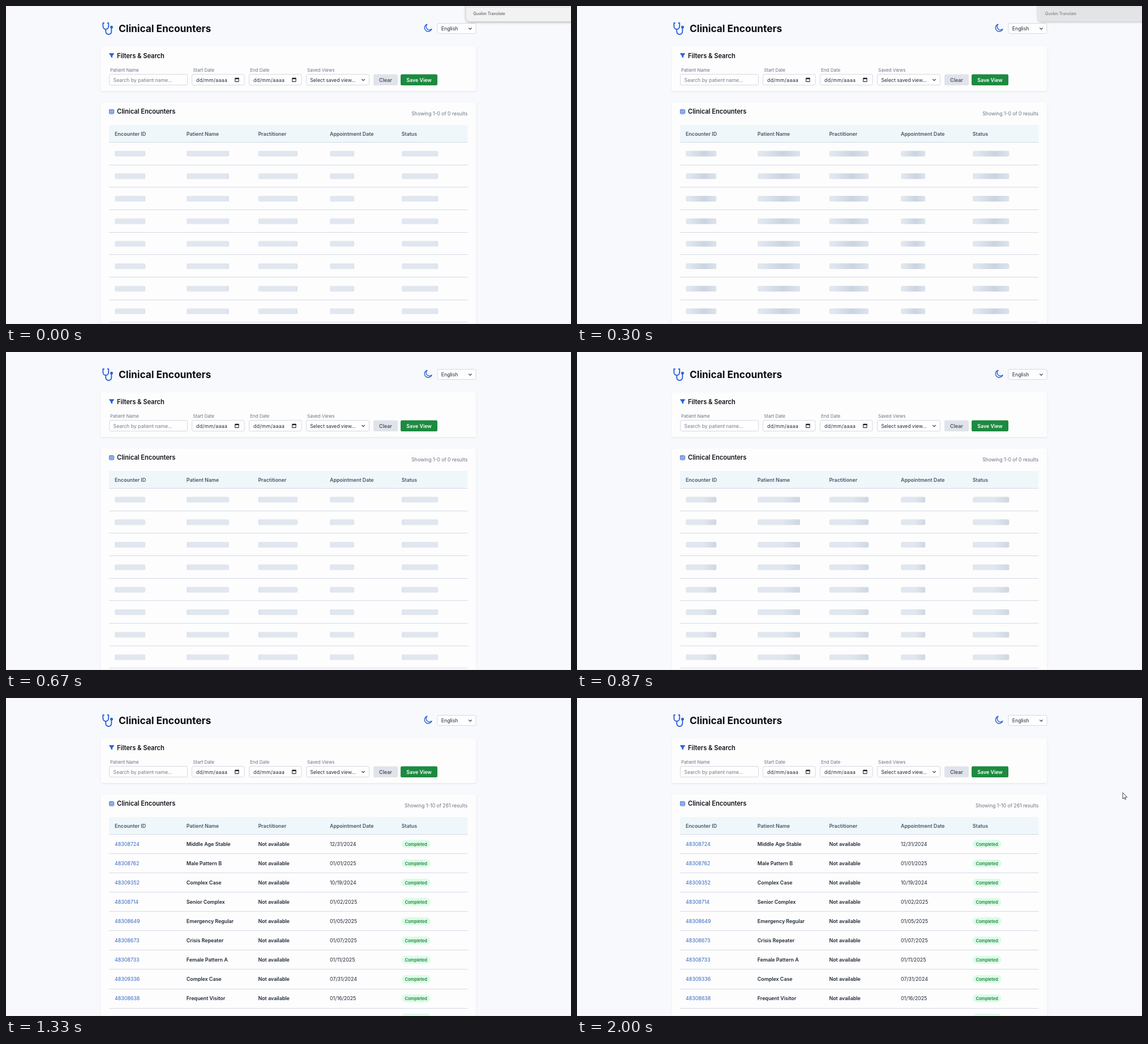
An HTML page with a canvas that plays this animation: 998 px wide and 561 px high, repeating every 2.03 s.

```html
<!DOCTYPE html>
<html lang="en">
<head>
<meta charset="utf-8">
<title>Clinical Encounters</title>
<style>
html, body { margin: 0; width: 100%; height: 100%; overflow: hidden; background: #f7f9fc; }
canvas { display: block; width: 998px; height: 561px; }
</style>
</head>
<body>
<canvas id="stage" width="998" height="561"></canvas>
<script>
const ctx = document.getElementById('stage').getContext('2d');
const LOOP = 2030, LOADED = 1230;
const FONT = 'Inter, "Open Sans", sans-serif';
const BLUE = '#2b62d9', LINE = '#d5d9e3', MUTED = '#6b7280', INK = '#1f2937';
const COLS = [192, 318.8, 445.4, 572, 698.7];
const HEADS = ['Encounter ID', 'Patient Name', 'Practitioner', 'Appointment Date', 'Status'];
const BARS = [54, 75, 69.5, 43, 64.5];
const ROWS = [
  ['48308724', 'Middle Age Stable', '12/31/2024'],
  ['48308762', 'Male Pattern B', '01/01/2025'],
  ['48309352', 'Complex Case', '10/19/2024'],
  ['48308714', 'Senior Complex', '01/02/2025'],
  ['48308649', 'Emergency Regular', '01/05/2025'],
  ['48308673', 'Crisis Repeater', '01/07/2025'],
  ['48308733', 'Female Pattern A', '01/11/2025'],
  ['48309336', 'Complex Case', '07/31/2024'],
  ['48308638', 'Frequent Visitor', '01/16/2025'],
  ['48308152', 'Super Utilizer', '10/05/2024']
];

const clamp = v => Math.max(0, Math.min(1, v));

// mid is the vertical centre of the capitals
function text(str, x, mid, size, color, weight = 400, align = 'left') {
  ctx.font = `${weight} ${size}px ${FONT}`;
  ctx.fillStyle = color;
  ctx.textAlign = align;
  ctx.fillText(str, x, mid + size * 0.364);
}

function box(x, y, w, h, r, fill, stroke) {
  ctx.beginPath();
  ctx.roundRect(x, y, w, h, r);
  if (fill) { ctx.fillStyle = fill; ctx.fill(); }
  if (stroke) { ctx.strokeStyle = stroke; ctx.lineWidth = 1; ctx.stroke(); }
}

function shadow(color, blur, y) {
  ctx.shadowColor = color;
  ctx.shadowBlur = blur;
  ctx.shadowOffsetY = y;
}

function path(d, color, width) {
  const p = new Path2D(d);
  if (width) {
    ctx.strokeStyle = color;
    ctx.lineWidth = width;
    ctx.lineCap = ctx.lineJoin = 'round';
    ctx.stroke(p);
  } else {
    ctx.fillStyle = color;
    ctx.fill(p);
  }
}

function card(y, h) {
  ctx.save();
  shadow('rgba(30,41,59,0.10)', 3, 1);
  box(167, y, 663.5, h, 4, '#fdfdfe');
  ctx.restore();
}

const field = (x, w, y = 120.5, h = 19) => box(x + 0.5, y, w - 1, h, 2.5, '#fefefe', LINE);
const chevron = (x, y) => path(`M${x - 2.3} ${y - 1.2}l2.3 2.4l2.3 -2.4`, '#30343b', 1.2);

function rule(y, color = LINE) {
  ctx.fillStyle = color;
  ctx.fillRect(182, Math.round(y - 0.5), 633.5, 1);
}

function dateField(x) {
  field(x, 93.5);
  ctx.letterSpacing = '0.4px';
  text('dd/mm/aaaa', x + 8, 130.5, 8.63, INK);
  ctx.letterSpacing = '0px';
  path(`M${x + 77} 128h6v5.5h-6z`, '#16191f', 1);
  path(`M${x + 76.5} 127h7v2h-7zM${x + 77.7} 126h1.1v1h-1.1zM${x + 81.2} 126h1.1v1h-1.1z`, '#16191f');
}

function header() {
  path('M173 30H171.3V35.5C171.3 39 173.5 41 176.2 41S181.2 39 181.2 35.5V30H179.5' +
    'M176.2 41V44.5C176.2 48 178.3 50 181.2 50S186.3 48 186.3 44.5V38.5', BLUE, 1.9);
  path('M183.9 37.3a2.5 2.5 0 1 0 5 0a2.5 2.5 0 1 0 -5 0z', BLUE);
  text('Clinical Encounters', 199, 40, 17.25, '#0a0c10', 700);
  path('M744 32.2A6.5 6.5 0 1 0 752 40.6A5.8 5.8 0 0 1 744 32.2z', BLUE, 1.4);
  field(761.5, 69, 30.5, 18);
  text('English', 768.7, 40, 8.75, INK);
  chevron(820, 40);
}

function filters() {
  card(71, 79);
  path('M182.3 83.3H190.8V84.5L188 88V91.5L185.2 90V88L182.3 84.5z', BLUE);
  text('Filters & Search', 196, 87.5, 11.09, '#0f1217', 600);
  text('Patient Name', 184, 113.3, 8, MUTED);
  text('Start Date', 330.2, 113, 8, MUTED);
  text('End Date', 431, 113, 8, MUTED);
  text('Saved Views', 532, 113.3, 8, MUTED);
  field(182, 139);
  text('Search by patient name...', 189.6, 130.5, 8.63, '#757b85');
  dateField(328);
  dateField(429);
  field(530, 112);
  text('Select saved view...', 537.3, 130.5, 8.63, INK);
  chevron(631, 130.5);
  box(649, 120.5, 43, 19.5, 2.5, '#e0e3e9');
  text('Clear', 670.5, 130.5, 8.87, '#4b5563', 600, 'center');
  box(697, 120.5, 65, 19.5, 2.5, '#1d8a40');
  text('Save View', 729.5, 130.5, 8.87, '#fff', 600, 'center');
}

function tableTop(loaded) {
  card(170, 400);
  box(182.5, 182.8, 8, 7.2, 1, null, BLUE);
  path('M182.5 185H190.5M182.5 187.5H190.5M185.2 183V190M187.9 183V190', BLUE, 0.8);
  text('Clinical Encounters', 196, 186.3, 11.09, '#0f1217', 600);
  text(loaded ? 'Showing 1-10 of 261 results' : 'Showing 1-0 of 0 results',
    815.2, 190.2, 8.63, MUTED, 400, 'right');
  ctx.fillStyle = '#eff7fb';
  ctx.fillRect(182, 210, 633.5, 30);
  HEADS.forEach((h, i) => text(h, COLS[i], 225.5, 8.87, '#4b5563', 600));
  rule(240.3);
}

function skeleton(t) {
  // highlight centre in bar widths, travelling left and repeating every two widths
  const mid = 1.4 - t / 375;
  BARS.forEach((w, c) => {
    const x = COLS[c] + 0.2;
    const near = ((mid + 0.5) % 2 + 2) % 2 - 0.5;
    const g = ctx.createLinearGradient(x, 0, x + w, 0);
    for (let i = 0; i <= 20; i++) {
      const u = i / 20;
      const d = Math.min(Math.abs(u - near), Math.abs(u - near + 2), Math.abs(u - near - 2));
      const k = clamp(1 - d * 2);
      g.addColorStop(u, `rgb(${225 - 23 * k},${231 - 19 * k},${239 - 15 * k})`);
    }
    for (let r = 0; r < 8; r++) box(x, 255.6 + r * 39.7, w, 10, 2.5, g);
  });
  for (let r = 1; r <= 8; r++) rule(240.3 + r * 39.7);
}

function rows() {
  ROWS.forEach(([id, name, date], r) => {
    const y = 257.6 + r * 34.03;
    text(id, COLS[0], y, 8.87, '#3568c0');
    text(name, COLS[1], y, 8.87, INK, 600);
    text('Not available', COLS[2], y, 8.87, INK, 600);
    text(date, COLS[3], y, 8.87, INK);
    box(COLS[4], y - 7, 51, 14, 7, '#dcfce7');
    text('Completed', COLS[4] + 25.5, y + 0.2, 7.45, '#22843f', 600, 'center');
    rule(y + 17.2);
  });
}

function popup(t) {
  const k = clamp((t - 270) / 130);
  if (k >= 1) return;
  const s = 1 - 0.08 * k;
  ctx.save();
  ctx.globalAlpha = 1 - k;
  ctx.translate(905, 0);
  ctx.scale(s, s);
  ctx.translate(-905, 0);
  shadow('rgba(0,0,0,0.35)', 4, 1);
  box(812.5, -20, 220, 47.5, 7, '#f2f2f3');
  shadow('transparent', 0, 0);
  ctx.fillStyle = '#dcdde0';
  ctx.fillRect(813, 1.5, 200, 1);
  text('Quolim Translate', 825.3, 13.6, 7, '#5f6368', 500);
  ctx.restore();
}

function cursor(t) {
  if (t < 1870) return;
  const k = 1 - (1 - clamp((t - 1870) / 120)) ** 2;
  ctx.save();
  ctx.translate(964 - 34 * (1 - k), 167.3 - 34 * (1 - k));
  const d = 'M0 0V10.6L2.4 8.4L4 11.8L5.6 11L4.1 7.8H7.3z';
  path(d, '#fff');
  path(d, '#2a2d33', 0.9);
  ctx.restore();
}

function draw(t) {
  const loaded = t >= LOADED;
  ctx.fillStyle = '#f7f9fc';
  ctx.fillRect(0, 0, 998, 561);
  header();
  filters();
  tableTop(loaded);
  if (loaded) rows(); else skeleton(t);
  ctx.fillStyle = '#d9fadb';
  ctx.fillRect(0, 560, 998, 1);
  popup(t);
  cursor(t);
}

const start = performance.now();
function tick() {
  draw((performance.now() - start) % LOOP);
  requestAnimationFrame(tick);
}
tick();
</script>
</body>
</html>
```
